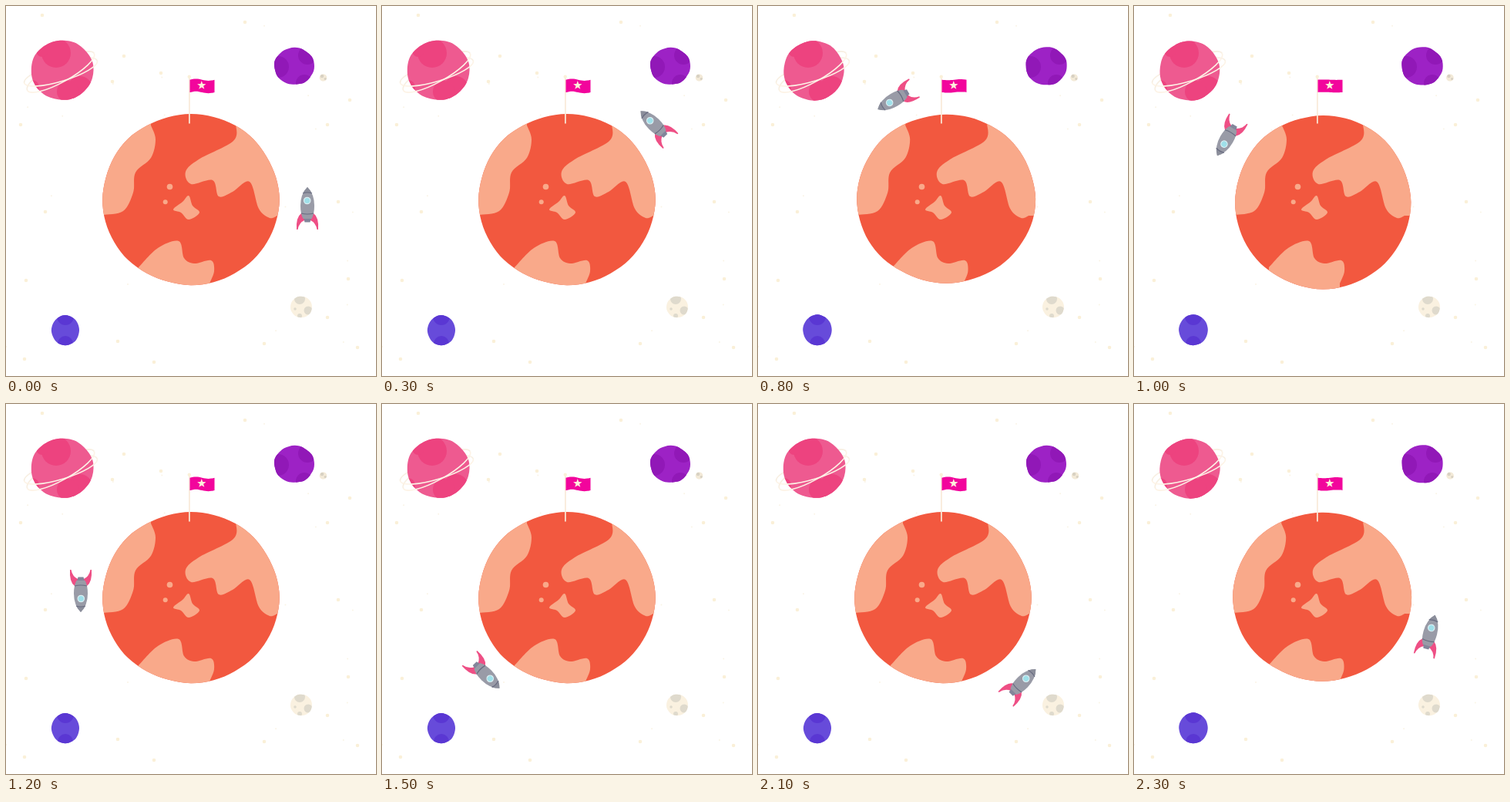
Write an HTML page that moves like this. It is 480 px wide and 480 px high and loops after 2400 ms.

```html
<!DOCTYPE html>
<html lang="en">
<head>
<meta charset="utf-8">
<title>Rocket orbit</title>
<style>
  html, body { margin: 0; width: 100%; height: 100%; overflow: hidden; background: #fff; }
  svg { display: block; width: 100vw; height: 100vh; }
</style>
</head>
<body>
<svg id="stage" viewBox="0 0 480 480"></svg>
<script>
const STEP = 100, STEPS = 24;
const ORBIT = '244 252.5';
const RED = '#f2583f', PEACH = '#f9a98a', STAR = '#faf0d8';
const stage = document.getElementById('stage');

// Hand-drawn wobble: the scene cycles through three slightly different drawings
const poses = [
  { mars: [239.7, 251, 114.5, 110.8], puff: 0, drift: 0, wave: 1.8 },
  { mars: [245, 254.5, 113.8, 112.5], puff: 0.8, drift: 1, wave: 0.3 },
  { mars: [244, 250, 115.7, 109.3], puff: 0.7, drift: 0.8, wave: -0.9 }
];

function add(parent, tag, attrs = {}) {
  const node = document.createElementNS('http://www.w3.org/2000/svg', tag);
  for (const key in attrs) node.setAttribute(key, attrs[key]);
  return parent.appendChild(node);
}

const path = (parent, d, fill, more) => add(parent, 'path', { d, fill, ...more });
const dot = (parent, cx, cy, r, fill, more) => add(parent, 'circle', { cx, cy, r, fill, ...more });
const spots = (parent, fill, list) => list.forEach(s => dot(parent, ...s, fill));

function pairs(text) {
  return text.trim().split(/\s{2,}|,\s*/).map(p => p.split(' ').map(Number));
}

// Catmull-Rom curve through the points
function smooth(pts, closed) {
  const n = pts.length;
  const at = i => closed ? pts[(i + n) % n] : pts[Math.max(0, Math.min(n - 1, i))];
  let d = 'M' + pts[0];
  for (let i = 0; i < (closed ? n : n - 1); i++) {
    const [a, b, c, e] = [at(i - 1), at(i), at(i + 1), at(i + 2)];
    const p = [0, 1].map(k => b[k] + (c[k] - a[k]) / 6);
    const q = [0, 1].map(k => c[k] - (e[k] - b[k]) / 6);
    d += `C${p} ${q} ${c}`;
  }
  return closed ? d + 'Z' : d;
}

// Slightly uneven disc that also clips whatever is drawn on it
let clips = 0;
function globe(parent, [cx, cy, rx, ry], fill, rough = 0.01) {
  const id = 'clip' + clips++;
  const pts = Array.from({ length: 24 }, (_, i) => {
    const a = i * Math.PI / 12;
    const k = 1 + rough * (Math.sin(5 * a + clips) + Math.sin(8 * a + 2 * clips)) / 2;
    return [cx + rx * k * Math.cos(a), cy + ry * k * Math.sin(a)];
  });
  const d = smooth(pts, true);
  path(add(parent, 'clipPath', { id }), d, '#000');
  path(parent, d, fill);
  return add(parent, 'g', { 'clip-path': `url(#${id})` });
}

// Coast lines; each patch runs off the planet and is clipped by its rim
const land = {
  left: pairs('188 155, 194 173, 188 197, 168 216, 165 242, 152 266, 126 271'),
  right: pairs('298 153, 295 175, 250 199, 233 215, 240 231, 268 226, 276 247, 294 241, 316 228, 328 263, 342 275, 352 272'),
  low: pairs('172 339, 197 314, 224 305, 231 327, 244 334, 266 330, 270 344, 264 360'),
  mid: pairs('217 264, 229 254, 237 246, 242 259, 251 268, 237 277, 227 268')
};

function drawMars(parent, { mars, drift }) {
  const g = globe(parent, mars, RED, 0.006);
  const patch = (pts, shift, edge) => {
    const moved = pts.map(([x, y]) => [x + shift * drift, y]);
    path(g, smooth(moved) + edge(moved[0], moved[moved.length - 1]) + 'Z', PEACH);
  };
  const side = x => (a, z) => `H${x}V120H${a[0]}`;
  patch(land.left, 4, side(90));
  patch(land.right, -1, side(400));
  patch(land.low, 3, (a, z) => `V400H${a[0]}`);
  path(g, smooth(land.mid, true), PEACH);
  spots(g, PEACH, [[212.5, 234.5, 3.8], [206.7, 254.3, 3]]);
}

function drawPink(parent, puff) {
  const rings = [[12, -17], [13, -29]];
  const ring = (sweep, stroke) => rings.forEach(([b, tilt]) => path(parent,
    `M-49.500 0A49.500 ${b} 0 0 ${sweep} 49.500 0`, 'none',
    { stroke, 'stroke-width': 1.6, transform: `translate(71 85.500) rotate(${tilt})` }));
  ring(1, '#f8efe2');
  const g = globe(parent, [73 - puff, 83.3 + puff, 40.5 - 2 * puff, 38.6], '#ee5a90');
  spots(g, '#ed437f', [[65, 61, 19], [47, 58, 8], [96, 107, 16], [80, 111, 14], [34, 105, 9]]);
  ring(0, '#fdf3e6');
}

function drawSmall(parent, puff) {
  const purple = globe(parent, [374, 78, 26 + puff, 24 + puff], '#9d22c5', 0.018);
  spots(purple, '#9118b7', [[353, 79, 14], [391, 64, 12], [387, 100, 11]]);
  const blue = globe(parent, [77, 420.7 - puff / 2, 18 + puff, 19.5 + puff / 2], '#674bda');
  spots(blue, '#5a37d3', [[77, 403, 11], [77, 438, 10]]);
  const moon = globe(parent, [383, 390.5, 14, 13.8], '#faf1e0');
  spots(moon, '#dfdacd', [[381, 380, 7], [392, 395, 5.5], [375, 393, 1.8], [381, 402, 3]]);
  const x = 411.5 - 2 * puff;
  const pebble = globe(parent, [x, 93, 4.8, 4.6], '#f3ead8');
  spots(pebble, '#d8d1c3', [[x - 1.5, 91, 2.3], [x + 2.7, 94.5, 1.6]]);
}

function drawFlag(parent, wave) {
  path(parent, 'M237.900 91V152.500', 'none', { stroke: '#f9ead9', 'stroke-width': 1.7 });
  dot(parent, 237.7, 91.7, 2.2, STAR);
  const top = Array.from({ length: 9 }, (_, i) =>
    [238.5 + i * 4, 95.7 - wave * Math.sin(i * Math.PI / 4) / 1.5]);
  const low = top.map(([x, y]) => [x, y + 16.3]).reverse();
  path(parent, smooth(top) + smooth(low).replace('M', 'L') + 'Z', '#f2059c');
  const tips = Array.from({ length: 10 }, (_, i) => {
    const r = i % 2 ? 2.4 : 6, a = i * Math.PI / 5 - Math.PI / 2;
    return [253.8 + r * Math.cos(a), 103 + r * Math.sin(a)];
  });
  path(parent, 'M' + tips.join('L') + 'Z', '#fdf0dc');
}

function drawRocket(parent) {
  const fin = 'M383 269Q376 274 377 290H378.500Q380 281 388 277.500Z';
  const pink = '#ee4f85', line = { stroke: '#686b80', 'stroke-width': 1.2 };
  path(parent, fin, pink);
  path(parent, fin, pink, { transform: 'translate(782 0) scale(-1 1)' });
  path(parent, 'M386 274H396L394.500 280.500H387.500Z', '#82859a');
  path(parent, 'M391 235Q400 244 400 259Q400 270 396.500 276H385.500Q382 270 382 259Q382 244 391 235Z', '#999ba7');
  path(parent, 'M391 235Q395 239 397 243Q391 241 385 243Q387 239 391 235Z', '#8b8e9b');
  path(parent, 'M385 243Q391 241 397 243M383 269Q391 271 399 269', 'none', line);
  dot(parent, 390.7, 252.5, 4.2, '#9fe0ea', { stroke: '#dceff3', 'stroke-width': 1.2 });
}

function drawStars() {
  let seed = 7;
  const rnd = () => (seed = seed * 16807 % 2147483647) / 2147483647;
  for (let i = 0; i < 24; i++) dot(stage, 480 * rnd(), 480 * rnd(), 1, '#faf4e6');
  pairs(`47 12, 310 21, 153 65, 201 87, 138 98, 19 154, 446 122, 417 154, 51 267, 431 254,
    26 356, 444 354, 417 404, 145 435, 192 462, 24 458, 335 438, 456 443`)
    .forEach(([x, y]) => dot(stage, x, y, 2.3, STAR));
}

function layer(draw) {
  const g = add(stage, 'g');
  draw(g);
  return g;
}

drawStars();
const worlds = poses.map(pose => layer(g => {
  drawMars(g, pose);
  drawPink(g, pose.puff);
  drawSmall(g, pose.puff);
}));
const rocket = layer(drawRocket);
const banners = poses.map(pose => layer(g => drawFlag(g, pose.wave)));

const start = performance.now();
function render() {
  const i = Math.floor((performance.now() - start) / STEP) % STEPS;
  const show = (g, k) => g.setAttribute('visibility', k === i % 3 ? 'visible' : 'hidden');
  worlds.forEach(show);
  banners.forEach(show);
  rocket.setAttribute('transform', `rotate(${-360 / STEPS * i} ${ORBIT})`);
  requestAnimationFrame(render);
}
render();
</script>
</body>
</html>
```
